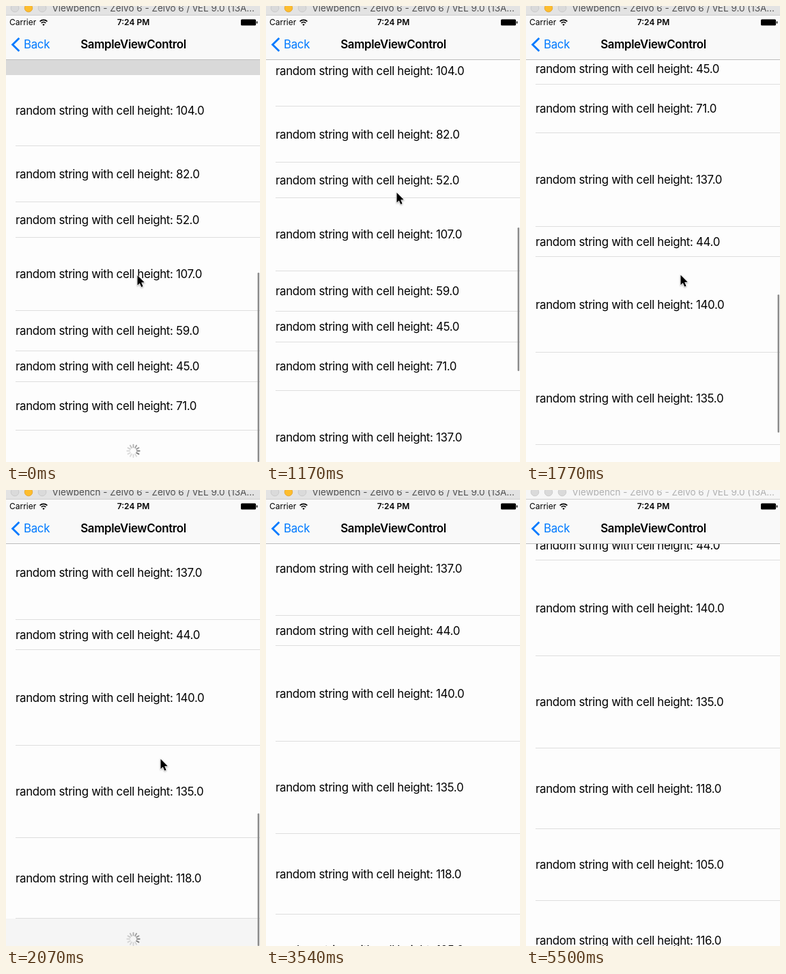
These frames come from a looping animation (372 by 667 pixels, 5.53 s). An HTML page:

```html
<!DOCTYPE html>
<html lang="en">
<head>
<meta charset="utf-8">
<title>Endless list</title>
<style>
  html, body { margin: 0; width: 100%; height: 100%; overflow: hidden; background: #fdfdfd; }
  svg { display: block; width: 372px; height: 667px; }
  text { font: 16.87px Inter, "Liberation Sans", sans-serif; letter-spacing: -0.33px; white-space: pre; }
  text.strong { font-weight: 600; text-anchor: middle; }
  text.status { font-size: 12px; letter-spacing: 0; }
  text.window { font-size: 13.5px; letter-spacing: 0; }
</style>
</head>
<body>
<svg viewBox="0 0 372 667">
  <rect width="372" height="667" fill="#fdfdfd"/>
  <g id="list"></g>
  <rect id="band" y="79" width="372" fill="#d9d9d9"/>
  <rect id="bar" x="368.5" width="2.5" rx="1.25" fill="#8c8c8c"/>

  <g id="navigation">
    <rect y="13" width="372" height="65" fill="#f9f9f9"/>
    <rect y="78" width="372" height="1" fill="#bdbdbd"/>
    <text class="status" x="5" y="28.3">Carrier</text>
    <g fill="none" stroke="#000" stroke-width="1.7">
      <path d="M49.6 22.6a7.7 7.7 0 0 1 10.8 0M51.7 25a4.8 4.8 0 0 1 6.6 0"/>
      <path d="M55 29l-1.7-1.9a2.5 2.5 0 0 1 3.4 0z" fill="#000" stroke="none"/>
    </g>
    <text class="status strong" x="186.5" y="28.3">7:24 PM</text>
    <rect x="344" y="19.5" width="22" height="9" rx="1.5"/>
    <rect x="366.8" y="22.3" width="1.5" height="3.4" rx=".7"/>
    <path d="M19.3 47L9.6 56.5l9.7 9.5" fill="none" stroke="#007aff" stroke-width="2.8"/>
    <text x="26" y="62.3" fill="#007aff">Back</text>
    <text class="strong" x="186.5" y="62.3">SampleViewControl</text>
  </g>

  <g id="window">
    <rect id="chrome" width="372" height="13"/>
    <rect y="13" width="372" height="1" fill="#cfcfcf"/>
    <g stroke-width=".8" fill="#dadada" stroke="#c6c6c6">
      <circle cx="13" cy="3" r="5.8"/>
      <circle id="minimise" cx="33" cy="3" r="5.8"/>
      <circle cx="53" cy="3" r="5.8"/>
    </g>
    <text id="caption" class="window" x="67.5" y="8">Viewbench - Zelvo 6 - Zelvo 6 / vEL 9.0 (13A…</text>
  </g>

  <path id="cursor" d="M0 0V14.4L3.3 11.4L5.8 17L8.1 16L5.7 10.5L10.2 10.2Z"
    stroke="#fff" stroke-width="1.3" paint-order="stroke" style="filter:drop-shadow(0 1px 1px #0005)"/>
</svg>
<script>
const LOOP = 5530, TICK = 148, LEAD = 14;
const LIST_TOP = 101;
const heights = [104, 82, 52, 107, 59, 45, 71, 137, 44, 140, 135, 118, 105, 116, 90];
const $ = id => document.getElementById(id);

function add(parent, tag, attrs) {
  const node = document.createElementNS('http://www.w3.org/2000/svg', tag);
  set(node, attrs);
  return parent.appendChild(node);
}
function set(node, attrs) {
  for (const key in attrs) node.setAttribute(key, attrs[key]);
}

// Tracks are lists of [tick, value, ...], linear in between.
function track(keys, k) {
  const i = keys.findIndex(key => key[0] > k);
  if (i < 0) return keys[keys.length - 1].slice(1);
  const a = keys[i - 1], b = keys[i], f = (k - a[0]) / (b[0] - a[0]);
  return a.slice(1).map((v, j) => v + (b[j + 1] - v) * f);
}

const scroll = [[0, 0], [1, 20], [2, 41], [3, 54], [4, 58], [8, 58], [9, 126], [10, 206],
  [12, 435], [13, 520], [14, 568], [15, 583], [17, 576], [18, 574], [26, 574],
  [27, 592], [28, 632], [29, 670], [30, 691], [31, 699]];
const pointer = [[0, 192.5, 394], [4, 191.5, 273], [8, 191.5, 273], [10, 226.5, 393.5],
  [17, 226.5, 393.5], [21, 316, 634], [24, 316, 634]];
const exit = [[32, 303, 470], [34, 306, 607]];
const thumb = [[0, 390, 667], [4, 420, 667], [7, 420, 667], [8, 324, 534], [10, 371, 581],
  [14, 473, 667], [15, 483, 667], [18, 475, 667], [26, 395, 558], [31, 426, 589]];
const thumbAlpha = [[0, 1], [18, 1], [21, 0], [26, 0], [27, 1], [32, 1], [35, 0]];

const list = $('list');
let bottom = LIST_TOP;
const rows = heights.map(h => {
  const top = bottom, g = add(list, 'g', {});
  bottom += h;
  add(g, 'text', { x: 14, y: top + h / 2 + 5.5 }).textContent =
    `random string with cell height: ${h.toFixed(1)}`;
  add(g, 'rect', { x: 14, y: bottom - 1, width: 358, height: 1, fill: '#dedede' });
  return { g, bottom };
});

const footer = add(list, 'g', {});
const footerFill = add(footer, 'rect', { width: 372, height: 140 });
const spokes = Array.from({ length: 12 }, (_, i) => add(footer, 'path', {
  d: 'M0 -5.3V-9.2', transform: `translate(186.5 29.8) rotate(${i * 30})`,
  stroke: '#777', 'stroke-width': 1.9, 'stroke-linecap': 'round'
}));

function pointerAt(k, offset) {
  if (k < 24) return track(pointer, k);
  if (k < 27 || k >= 35) return null;
  return k < 32 ? [303, 1169 - offset] : track(exit, k);
}

function draw(t) {
  const k = Math.floor((t + LEAD) / TICK);
  const [offset] = track(scroll, k);
  const loaded = k < 8 ? 7 : k < 21 ? 12 : heights.length;

  list.setAttribute('transform', `translate(0 ${-Math.round(offset)})`);
  rows.forEach((row, i) => set(row.g, { visibility: i < loaded ? 'visible' : 'hidden' }));
  set(footer, { transform: `translate(0 ${rows[loaded - 1].bottom})` });
  set(footerFill, { fill: k ? '#f5f5f5' : '#fdfdfd' });
  const head = Math.floor((k < 8 ? Math.min(k, 4) : k) * 1.77) + 4;
  spokes.forEach((s, i) => set(s, { opacity: Math.max(.25, 1 - ((head - i + 24) % 12) * .11) }));

  set($('band'), { height: Math.max(0, LIST_TOP - 79 - offset) });
  const [top, end] = track(thumb, k);
  set($('bar'), { y: top, height: end - top, opacity: track(thumbAlpha, k)[0] });

  const tip = pointerAt(k, offset);
  set($('cursor'), tip
    ? { visibility: 'visible', transform: `translate(${tip})` }
    : { visibility: 'hidden' });

  const active = t < 5500;
  set($('chrome'), { fill: active ? '#e3e3e3' : '#f6f6f6' });
  set($('caption'), { fill: active ? '#505050' : '#b0b0b0' });
  set($('minimise'), active
    ? { fill: '#fdbd2e', stroke: '#e2a12a' }
    : { fill: '#dadada', stroke: '#c6c6c6' });
}

const start = performance.now();
function frame() {
  draw((performance.now() - start) % LOOP);
  requestAnimationFrame(frame);
}
frame();
</script>
</body>
</html>
```
